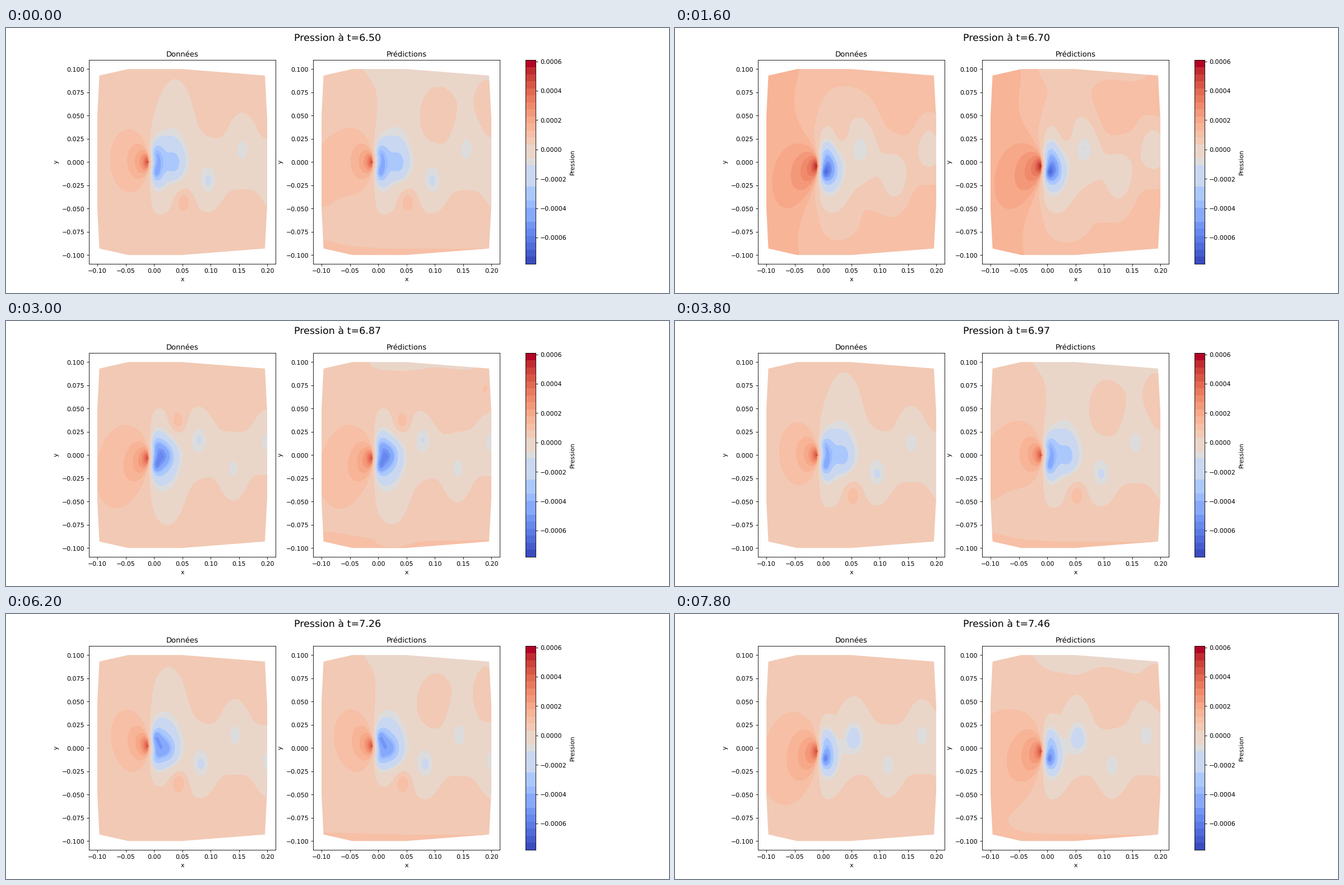
A matplotlib script that plays this animation: 1183x473 px, repeating every 8 s.

```python
import numpy as np
import matplotlib.pyplot as plt
from matplotlib.animation import FuncAnimation
from matplotlib.colors import ListedColormap
from matplotlib.patches import Polygon

plt.rcParams["text.hinting"] = "none"

W, H, DPI = 1183, 473, 78.87
FRAMES, INTERVAL = 40, 200
PERIOD = 19 / 3                      # frames per vortex shedding cycle
P_MIN, P_MAX, BANDS = -0.000779, 0.000608, 29
BOTTOM, TOP = 0.11, 0.8785

# Pressure is computed in units of colour bands; a few pale bands are merged.
LEVELS = np.array([k for k in range(BANDS + 1) if k not in (7, 10, 12, 13, 16)])
COOLWARM = plt.get_cmap("coolwarm")
COLORS = [COOLWARM((a + b - 1) / 2 / (BANDS - 1))
          for a, b in zip(LEVELS[:-1], LEVELS[1:])]

X, Y = np.meshgrid(np.linspace(-0.1, 0.2, 211), np.linspace(-0.1, 0.1, 181))

UPPER_EDGE = [(-0.1, 0.05), (-0.0965, 0.093), (-0.0455, 0.1),
              (0.049, 0.1), (0.196, 0.093), (0.2, 0.046)]
OUTLINE = UPPER_EDGE + [(x, -y) for x, y in reversed(UPPER_EDGE)]


def pulse(v, center, width):
    return np.exp(-((v - center) / width) ** 2)


def bump(cx, cy, sx, sy):
    return pulse(X, cx, sx) * pulse(Y, cy, sy)


def step(v, edge, width):
    return 1 / (1 + np.exp(-(v - edge) / width))


def wave(phase, peak, harmonic=1):
    return np.cos(2 * np.pi * harmonic * (phase - peak))


def lift(phase):
    """Surge of the overall pressure, twice per shedding cycle."""
    return max(0, wave(phase, 0.275, 2)) ** 2


def vortex(age, side):
    """Low pressure of one vortex: it grows near the body, then drifts away."""
    x = 0.006 + 0.012 * np.logaddexp(0, (age + 0.25) / 0.1)
    y = 0.015 - 0.02 * pulse(age, -0.05, 0.16) + 0.008 * pulse(age, 0.58, 0.2)
    young = pulse(age, -0.14, 0.24)
    tall = pulse(age, -0.05, 0.11)
    core = step(age, -0.55, 0.08) * (1.2 + 3.6 * young) + 0.7 * pulse(age, 0.45, 0.12)
    size = 0.0138 + 0.002 * young
    halo = 1.4 * step(age, -0.65, 0.05)
    return (core * bump(x, side * y, size, size)
            + 3.7 * pulse(age, -0.1, 0.22) * bump(x - 0.008, side * 0.01, 0.029, 0.027)
            + halo * bump(x, side * (0.02 + 0.012 * tall),
                          0.027 + 0.013 * tall, 0.034 + 0.034 * tall))


def front(phase):
    """Overpressure upstream: circles that all touch the nose."""
    y0 = 0.004 * wave(phase, 0.75)
    dx = X + 0.010
    dy = Y - y0 + 0.22 * wave(phase, 0.78) * dx
    diameter = (dx ** 2 + dy ** 2) / np.maximum(-dx, 1e-5)
    size = 0.031 + 0.007 * wave(phase, 0.19, 2)
    return ((6 + 2 * lift(phase)) * np.exp(-diameter / size)
            + 2.5 * bump(-0.010, y0, 0.008, 0.009))


def pressure(phase):
    surge = lift(phase)
    wake = 6 * bump(0.007, 0, 0.014, 0.022)
    rise = 0
    for n in range(-2, 4):
        wake = wake + vortex(phase + n / 2, 1 if n % 2 == 0 else -1)
    for side, shift in ((1, 0), (-1, 0.5)):
        p = phase + shift
        wake = wake + (2.6 + 2.2 * wave(p, 0.72)) * bump(0.002, side * 0.012, 0.008, 0.008)
        b = (p + 0.5) % 1 - 0.5
        rise = rise + (1.7 * pulse(b, -0.08, 0.22)
                       * bump(0.052 + 0.08 * b, -side * (0.041 + 0.05 * b), 0.015, 0.014))
    strip = ((0.9 - 0.3 * surge) * pulse(Y, -0.004 * wave(phase, 0), 0.027)
             * step(X, 0.03, 0.012))
    swell = 1.35 * bump(0.03, 0, 0.075, 0.085) - 0.75 * step(-X, 0.025, 0.012) - 1
    gate = step(X, -0.006, 0.002)
    return 17.55 - surge * swell + front(phase) + rise - gate * (wake + strip)


def prediction_error(phase):
    surge = lift(phase)
    depth = 0.032 + 0.016 * wave(phase, 0.85)
    edge = -0.03 + 0.9 * np.minimum(0.1 - Y, 0.03)
    ceiling = (0.9 - 0.3 * surge) * pulse(Y, 0.1, depth) * step(X, edge, 0.008)
    return (-ceiling
            + 0.5 * bump(0.102, 0.048, 0.03, 0.04)
            + 0.55 * bump(0.19, 0.07, 0.018, 0.025)
            + 0.75 * (1 - surge) * pulse(Y, -0.105, 0.018)
            + (0.26 + 0.28 * wave(phase, 0.08, 2)) * bump(-0.1, -0.03, 0.045, 0.075)
            - (0.05 + 0.1 * surge) * step(X, 0.05, 0.02))


fig, axes = plt.subplots(1, 2, figsize=((W + 0.01) / DPI, (H + 0.01) / DPI), dpi=DPI)
fig.subplots_adjust(left=0.125, right=0.7449, bottom=BOTTOM, top=TOP, wspace=0.2)
heading = fig.suptitle("", fontsize=16)

for ax, name in zip(axes, ("Données", "Prédictions")):
    ax.set(title=name, xlabel="x", ylabel="y",
           xlim=(-0.115, 0.215), ylim=(-0.1095, 0.1095),
           xticks=np.linspace(-0.1, 0.2, 7), yticks=np.linspace(-0.1, 0.1, 9))

cax = fig.add_axes([927.2 / W, BOTTOM, 18.2 / W, TOP - BOTTOM])
cax.pcolormesh([0, 1], P_MIN + LEVELS * (P_MAX - P_MIN) / BANDS,
               np.arange(len(COLORS))[:, None], cmap=ListedColormap(COLORS))
cax.set(xticks=[], yticks=np.arange(-3, 4) * 0.0002, ylim=(P_MIN, P_MAX))
cax.yaxis.tick_right()
cax.yaxis.set_label_position("right")
cax.set_ylabel("Pression")

drawn = []


def update(i):
    while drawn:
        drawn.pop().remove()
    heading.set_text(f"Pression à t={6.503 + 0.0245 * i:.2f}")
    phase = i / PERIOD % 1
    data = pressure(phase)
    for ax, field in zip(axes, (data, data + prediction_error(phase))):
        cs = ax.contourf(X, Y, np.clip(field, 0.01, BANDS - 0.01),
                         levels=LEVELS, colors=COLORS)
        cs.set_clip_path(Polygon(OUTLINE, transform=ax.transData))
        drawn.append(cs)
    return drawn


anim = FuncAnimation(fig, update, frames=FRAMES, interval=INTERVAL,
                     init_func=lambda: update(0), repeat=True, repeat_delay=0)
plt.show()
```
